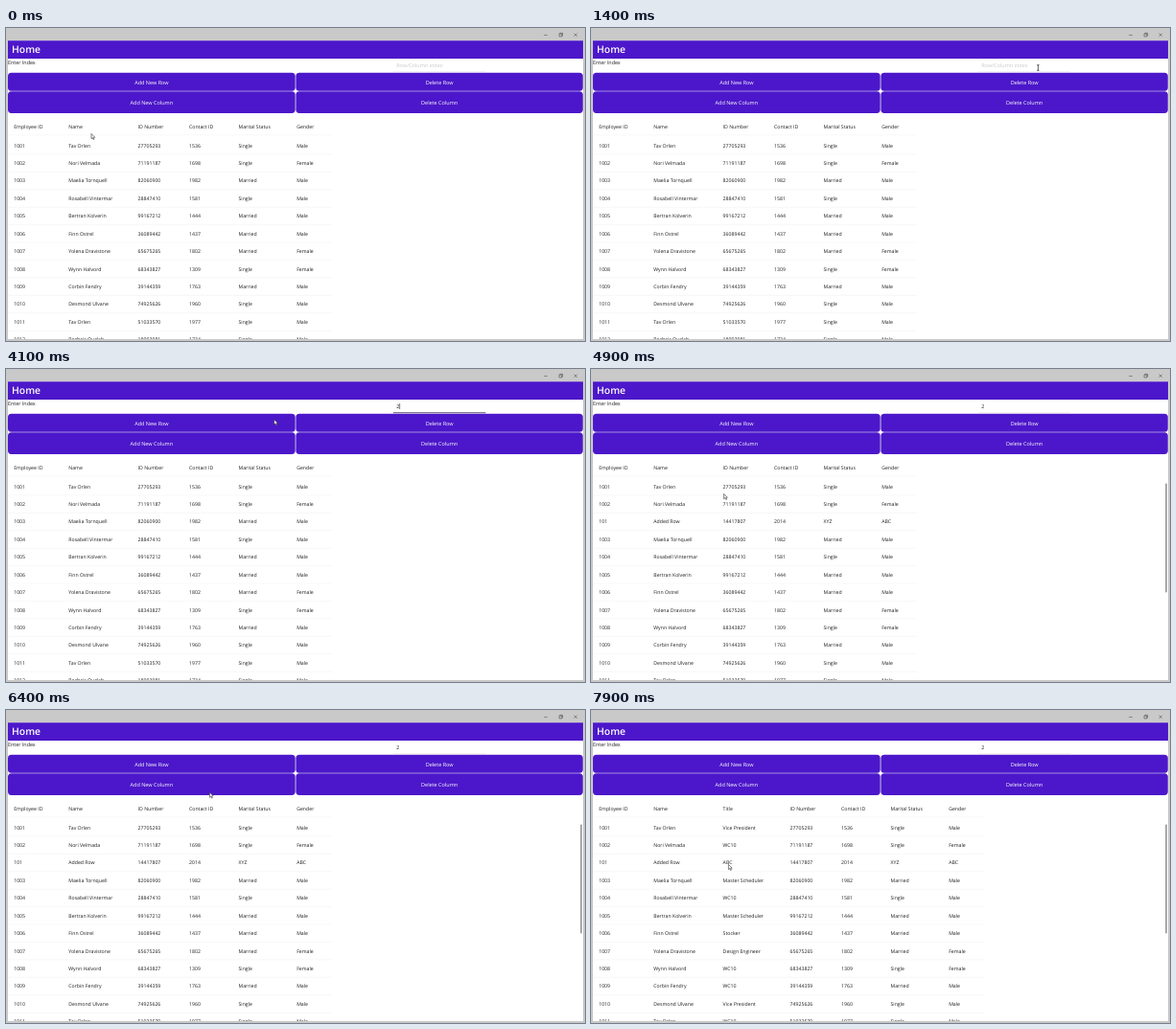
An HTML page that plays this animation: 604x327 px, repeating every 8 s.

```html
<!DOCTYPE html>
<html lang="en">
<head>
<meta charset="utf-8">
<title>Editable table</title>
<style>
  html, body { margin: 0; width: 100%; height: 100%; overflow: hidden; background: #fff; }
  svg { display: block; width: 604px; height: 327px; }
  text { font: 5.2px "Open Sans", "Noto Sans", sans-serif; fill: #1d1d1d; text-rendering: geometricPrecision; white-space: pre; }
  .title { font-size: 10.4px; font-weight: 600; fill: #fff; }
  .button { font-size: 5.5px; fill: #fff; text-anchor: middle; }
  .label { font-size: 5.4px; }
  .hint { font-size: 5.5px; fill: #c9c9c9; }
  .purple { fill: #4c17ca; }
  .rule { stroke: #f2f2f2; stroke-width: .6; }
</style>
</head>
<body>
<svg id="stage" viewBox="0 0 604 327"></svg>
<script>
const LOOP = 8000, STEP = 100;
const FOCUS = 2100, TYPED = 3400, ADD_ROW = 4600, ADD_COLUMN = 7000;
const TOP = 122.7, PITCH = 18.43, SHIFT = 70;

const headers = ["Employee ID", "Name", "ID Number", "Contact ID", "Marital Status", "Gender", "Title"];
const columnX = [8.2, 65.3, 137.6, 191, 242.5, 303.2, 137.6];
const people = `1001|Tav Orlen|27705293|1536|Single|Male|Vice President
1002|Nori Velmada|71191187|1698|Single|Female|WC10
1003|Maelia Tornquell|82060900|1982|Married|Male|Master Scheduler
1004|Rosabell Vintermar|28847410|1581|Single|Male|WC10
1005|Bertran Kolverin|99167212|1444|Married|Male|Master Scheduler
1006|Finn Ostrel|36089442|1437|Married|Male|Stocker
1007|Yolena Dravistone|65675265|1802|Married|Female|Design Engineer
1008|Wynn Halvord|68343827|1309|Single|Female|WC10
1009|Corbin Fendry|39144359|1763|Married|Male|WC10
1010|Desmond Ulvane|74925626|1960|Single|Male|Vice President
1011|Tav Orlen|51033570|1977|Single|Male|WC10
1012|Roderic Quelsh|18093981|1734|Single|Male|WC10`.split("\n").map(line => line.split("|"));
const addedRow = ["101", "Added Row", "14417807", "2014", "XYZ", "ABC", "ABC"];

// Pointer path: time, x, y
const path = [
  [0, 89, 110.4], [300, 92, 109], [900, 330, 68], [1300, 464, 41.5], [1400, 466.4, 41.5],
  [1900, 458, 42.5], [2800, 457.3, 43], [3500, 456, 43], [4100, 279.8, 52.8],
  [4400, 190, 56], [4600, 186, 57], [4900, 138.6, 130.4], [5300, 137, 156],
  [5600, 240, 158], [6000, 282, 150], [6400, 212.4, 86], [6700, 168, 78],
  [7000, 166, 78], [7500, 146, 150], [7900, 143.4, 161.4]
];

const stage = document.getElementById("stage");

function add(parent, tag, attrs = {}, content = "") {
  const el = document.createElementNS("http://www.w3.org/2000/svg", tag);
  for (const key in attrs) el.setAttribute(key, attrs[key]);
  el.textContent = content;
  return parent.appendChild(el);
}
const rect = (parent, x, y, width, height, attrs) => add(parent, "rect", { x, y, width, height, ...attrs });
const label = (parent, x, y, content, attrs) => add(parent, "text", { x, y, ...attrs }, content);
const show = (el, visible) => el.setAttribute("visibility", visible ? "visible" : "hidden");
const move = (el, x, y) => el.setAttribute("transform", `translate(${x} ${y})`);

// Window frame
rect(stage, 0, 0, 604, 327, { fill: "#c9c9c9" });
rect(stage, 2, 13, 600, 312, { fill: "#fff" });
rect(stage, 2, 13.2, 600, 18.8, { class: "purple" });
label(stage, 6, 25.8, "Home", { class: "title" });
add(stage, "path", {
  d: "M561.2 7.4h3.6M577 6.1h2.8v2.8h-2.8zM577.8 6.1v-.8h2.8v2.8h-.8M592.6 5.6l3.2 3.2M595.8 5.6l-3.2 3.2",
  fill: "none", stroke: "#444", "stroke-width": .55
});

// Entry
label(stage, 2, 38.3, "Enter Index", { class: "label" });
const idleLine = rect(stage, 404, 45.5, 96, .6, { fill: "#e6e6e6" });
const focusLine = rect(stage, 404, 45.3, 96.4, .9, { fill: "#484363" });
const hint = label(stage, 407.2, 40.5, "Row/Column index", { class: "hint" });
const typed = label(stage, 407.3, 40.8, "2", { class: "label" });
const caret = rect(stage, 0, 36, .6, 6, { fill: "#222" });

// Buttons
function button(x, y, width, height, caption, baseline) {
  rect(stage, x, y, width, height, { rx: 3.6, class: "purple" });
  label(stage, x + width / 2, baseline, caption, { class: "button" });
}
button(2, 46.8, 299.7, 19, "Add New Row", 58.5);
button(302.4, 46.8, 299.4, 19, "Delete Row", 58.5);
button(2, 66.3, 299.7, 22.6, "Add New Column", 79.8);
button(302.4, 66.3, 299.4, 22.6, "Delete Column", 79.8);

// Table
const clip = add(stage, "clipPath", { id: "view" });
rect(clip, 2, 90, 600, 235);
const table = add(stage, "g", { "clip-path": "url(#view)" });
const shifted = [], titles = [], rules = [];

function makeRow(cells) {
  const row = add(table, "g");
  cells.forEach((cell, i) => {
    const el = label(row, columnX[i], 1.9, cell);
    if (i === 6) titles.push(el);
    else if (i > 1) shifted.push(el);
  });
  rules.push(add(row, "line", { x1: 2, x2: 340, y1: 9.2, y2: 9.2, class: "rule" }));
  return row;
}
move(makeRow(headers), 0, 102.6);
const rows = people.map(makeRow);
const extra = makeRow(addedRow);
move(extra, 0, TOP + 2 * PITCH);
const scrollbar = rect(stage, 599.2, 119.5, 1.6, 114, { rx: .8, fill: "#949494" });

// Pointers
const arrow = add(stage, "path", {
  d: "M0 0V5.3L1.25 4.15L2.1 6.1L3 5.7L2.15 3.85H3.8Z",
  fill: "#fff", stroke: "#222", "stroke-width": .55
});
const beam = add(stage, "path", {
  d: "M-1.2 -2.8H1.2M0 -2.8V2.8M-1.2 2.8H1.2",
  fill: "none", stroke: "#222", "stroke-width": .7
});

function pointerAt(t) {
  let i = 1;
  while (i < path.length - 1 && path[i][0] < t) i++;
  const [t0, x0, y0] = path[i - 1], [t1, x1, y1] = path[i];
  const p = Math.min(1, (t - t0) / (t1 - t0));
  const ease = p * p * (3 - 2 * p);
  return [x0 + (x1 - x0) * ease, y0 + (y1 - y0) * ease];
}

function draw(time) {
  const t = Math.floor((time % LOOP) / STEP) * STEP;
  const focused = t >= FOCUS && t < ADD_ROW;
  const hasText = t >= TYPED, rowAdded = t >= ADD_ROW, columnAdded = t >= ADD_COLUMN;

  show(hint, !hasText);
  show(typed, hasText);
  show(focusLine, focused);
  show(idleLine, !focused);
  show(caret, focused);
  caret.setAttribute("x", hasText ? 410.5 : 407.2);

  rows.forEach((row, i) => move(row, 0, TOP + (i + (rowAdded && i > 1 ? 1 : 0)) * PITCH));
  show(extra, rowAdded);
  show(scrollbar, rowAdded);
  titles.forEach((el, i) => show(el, columnAdded && (rowAdded || i < titles.length - 1)));
  shifted.forEach(el => move(el, columnAdded ? SHIFT : 0, 0));
  rules.forEach(el => el.setAttribute("x2", columnAdded ? 411 : 340));

  const [x, y] = pointerAt(t);
  const overEntry = x > 404 && x < 500 && y > 33 && y < 46.5;
  show(arrow, !overEntry);
  show(beam, overEntry);
  move(overEntry ? beam : arrow, x, y);
}

const start = performance.now();
function tick() {
  draw(performance.now() - start);
  requestAnimationFrame(tick);
}
tick();
</script>
</body>
</html>
```
